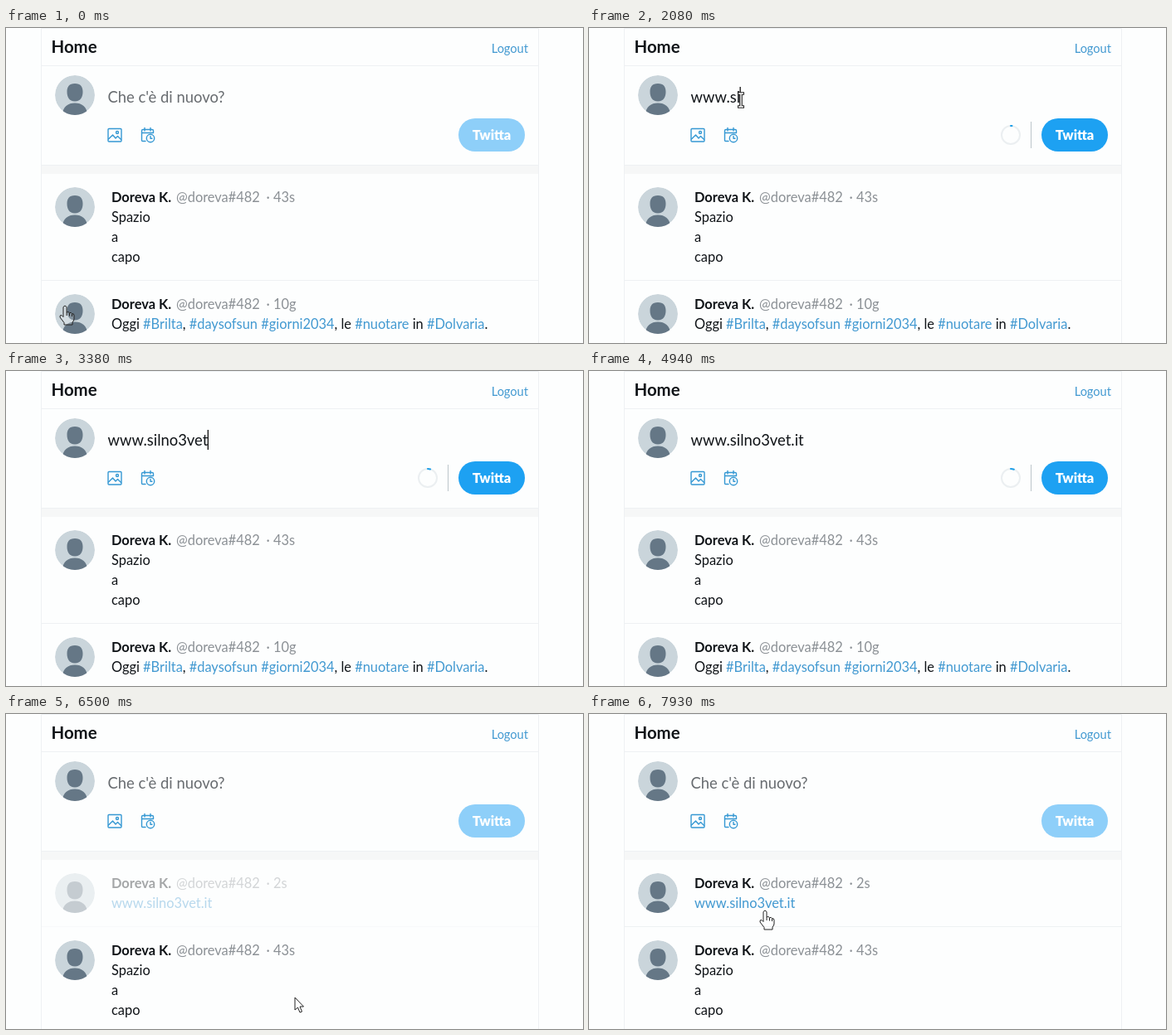
Write an HTML page that moves like this. It is 695 by 380 pixels and loops after 8000 ms.

```html
<!DOCTYPE html>
<html lang="it">
<head>
<meta charset="utf-8">
<style>
  html, body { margin: 0; width: 100%; height: 100%; overflow: hidden; background: #fdfefe; }
  svg { display: block; width: 695px; height: 380px; font: 16.4px Lato, "Open Sans", sans-serif; fill: #101418; }
  text { white-space: pre; transform: translateY(.7px); }
  .bold { font-weight: 700; }
  .muted { fill: #8b9095; }
  .link { fill: #4299d1; }
  .input { font-size: 18.4px; }
  .line { stroke: #eef1f3; fill: none; }
  .icon { fill: none; stroke: #3598d3; stroke-width: 1.4; stroke-linejoin: round; stroke-linecap: round; }
  .pointer { fill: #fff; fill-opacity: .2; stroke: #222; stroke-linejoin: round; }
</style>
</head>
<body>
<svg viewBox="0 0 695 380">
  <defs>
    <clipPath id="disc"><circle r="24"/></clipPath>
    <g id="avatar" clip-path="url(#disc)">
      <circle r="24" fill="#cad5db"/>
      <path fill="#657786" d="M0-14C7-14 9.5-10 9.5-4C9.5 2 7 7.500 0 7.500S-9.500 2-9.500-4C-9.500-10-7-14 0-14ZM-15 24C-15 14-8 9.500 0 9.500S15 14 15 24Z"/>
    </g>
  </defs>

  <g id="feed">
    <g id="spaced">
      <text x="127" y="233">Spazio</text>
      <text x="127" y="257">a</text>
      <text x="127" y="281">capo</text>
      <path class="line" d="M43 304.500H641"/>
    </g>
    <g id="holiday">
      <text x="127" y="362">Oggi <tspan class="link">#Brilta</tspan>, <tspan class="link">#daysofsun</tspan> <tspan class="link">#giorni2034</tspan>, le <tspan class="link">#nuotare</tspan> in <tspan class="link">#Dolvaria</tspan>.</text>
    </g>
  </g>
  <g id="fresh">
    <text class="link" x="127" y="233">www.silno3vet.it</text>
    <path class="line" d="M43 256.500H641"/>
  </g>

  <path fill="#f6f7f7" d="M43 165H641V176H43Z"/>
  <path class="line" d="M42.500 380V.5H641.500V380M43 45.500H641M43 165.500H641"/>
  <text class="bold" x="54.500" y="29" font-size="20.400">Home</text>
  <text class="link" x="629" y="29" font-size="14.600" text-anchor="end">Logout</text>
  <use href="#avatar" x="83" y="81"/>

  <text id="hint" class="input" x="122.500" y="89" fill="#686c70">Che c'è di nuovo?</text>
  <text id="typed" class="input" x="122.500" y="89"></text>
  <path id="caret" stroke="#111" stroke-width="1.300" d="M0 71V95"/>

  <g class="icon">
    <rect x="123" y="121.500" width="16" height="15.500" rx="1"/>
    <path d="M123.500 134L128.500 129L132 133L134.500 130.500L138.500 134.500"/>
    <circle cx="134" cy="126" r="1.500"/>
    <path d="M168 136.500H164.500Q163.500 136.500 163.500 135.500V124Q163.500 122.500 165 122.500H176Q177.500 122.500 177.500 124V126.500M163.500 126.500H177.500M167 120.500V124M174 120.500V124"/>
    <circle cx="174" cy="133" r="4.700"/>
    <path d="M174 130.500V133.300H176"/>
  </g>

  <g id="counter" fill="none" stroke-width="2">
    <circle cx="508" cy="129" r="11" stroke="#ebeff1"/>
    <circle id="progress" cx="508" cy="129" r="11" stroke="#1d9fe8" stroke-linecap="round" pathLength="280" transform="rotate(-90 508 129)"/>
    <path stroke="#bcc5cb" stroke-width="1" d="M532.500 113V145"/>
  </g>
  <rect id="button" x="545" y="109" width="80" height="40" rx="20"/>
  <text x="585" y="134" text-anchor="middle" fill="#fff" font-weight="900">Twitta</text>

  <g id="pointer">
    <path id="arrow" class="pointer" d="M0 0V15L3.500 12L6 18L8.500 17L6 11H10.500Z"/>
    <g id="hand">
      <path class="pointer" d="M-2 1.500Q0-1.500 2 1.500V8Q4 6.500 5.500 8.700Q7.500 7.500 8.500 9.700Q11 9 11 12V16Q11 18 9 20V23H-1V20.500L-6 14Q-6.500 11-4 11.500L-2 13.500Z"/>
      <path fill="none" stroke="#222" d="M2 8V12M5.500 9V12.500M8.500 10V13"/>
    </g>
    <g id="beam" fill="none">
      <path stroke="#222" stroke-width="3.600" d="M-4-8H4M-4 8H4M0-8V8"/>
      <path stroke="#fff" stroke-width="1.400" d="M-3-8H3M-3 8H3M0-8V8"/>
    </g>
  </g>
</svg>
<script>
const LOOP = 8000, STEP = 130, FOCUS = 1040, POSTED = 6240;
const MESSAGE = "www.silno3vet.it";
const KEYSTROKES = [1170, 1300, 1560, 1690, 1820, 2080, 2210, 2340,
  2470, 2860, 3120, 3250, 3380, 4030, 4160, 4290];
// time, x, y
const ROUTE = [[0, 71, 335], [650, 183, 87], [5070, 183, 87], [5720, 587, 128],
  [5980, 587, 128], [6500, 348, 342], [7800, 212, 237], [8000, 212, 237]];

const $ = id => document.getElementById(id);
const show = (id, visible) => $(id).style.display = visible ? "" : "none";
const clamp = v => Math.max(0, Math.min(1, v));

function addHeader(id, y, age) {
  $(id).insertAdjacentHTML("afterbegin", `
    <use href="#avatar" x="83" y="${y + 7}"/>
    <text class="bold" x="127" y="${y}">Doreva K.</text>
    <text class="muted" x="205" y="${y}">@doreva#482</text>
    <text class="muted" x="313.500" y="${y}">· ${age}</text>`);
}

function pointerAt(t) {
  const i = ROUTE.findIndex((p, n) => n && t <= p[0]);
  const [t0, x0, y0] = ROUTE[i - 1], [t1, x1, y1] = ROUTE[i];
  const u = (t - t0) / (t1 - t0), e = u * u * (3 - 2 * u);
  return [x0 + (x1 - x0) * e, y0 + (y1 - y0) * e];
}

function pointerKind(x, y, posted) {
  const inside = (l, t, r, b) => x >= l && x <= r && y >= t && y <= b;
  if (inside(545, 109, 625, 149) || inside(59, 192, 107, 240) || inside(59, 321, 107, 369)
    || (posted && inside(127, 218, 247, 240))) return "hand";
  return inside(115, 62, 625, 105) ? "beam" : "arrow";
}

function draw(now) {
  const t = Math.floor(now % LOOP / STEP) * STEP;
  const posted = t >= POSTED, focused = t >= FOCUS && !posted;
  const count = posted ? 0 : KEYSTROKES.filter(k => k <= t).length;

  $("typed").textContent = MESSAGE.slice(0, count);
  show("hint", !count);
  show("counter", count);
  $("progress").setAttribute("stroke-dasharray", `${count} 280`);
  $("button").style.fill = count ? "#1da1f2" : "#8ecff9";
  show("caret", focused && !(t >= 4940 && t < 5200));
  const width = count ? $("typed").getComputedTextLength() : 0;
  $("caret").setAttribute("transform", `translate(${122.5 + width})`);

  $("feed").setAttribute("transform", `translate(0 ${posted ? 81 : 0})`);
  $("fresh").style.opacity = clamp((t - POSTED) / 700);

  const [x, y] = pointerAt(t), kind = pointerKind(x, y, posted);
  $("pointer").setAttribute("transform", `translate(${x} ${y})`);
  show("pointer", t < 2210 || t >= 5200);
  for (const id of ["arrow", "hand", "beam"]) show(id, id === kind);
}

addHeader("spaced", 209, "43s");
addHeader("holiday", 338, "10g");
addHeader("fresh", 209, "2s");

function loop() {
  draw(performance.now());
  requestAnimationFrame(loop);
}
loop();
</script>
</body>
</html>
```
